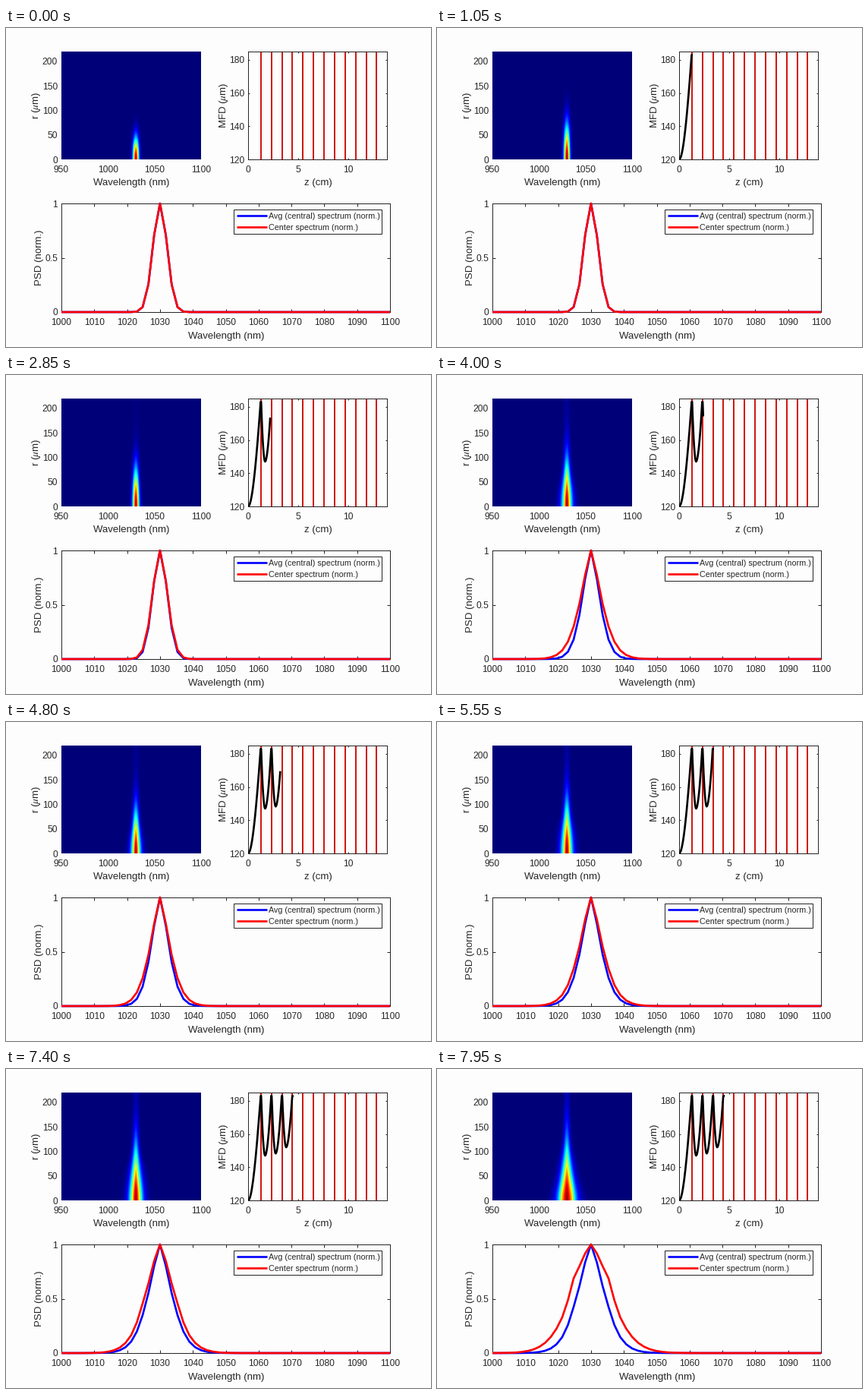
Animation of 560 by 420 pixels, one loop 8000 ms. Source, as a matplotlib script:

```python
import numpy as np
import matplotlib.pyplot as plt
from matplotlib.animation import FuncAnimation
from matplotlib.colors import LinearSegmentedColormap
from matplotlib.patches import Rectangle

plt.rcParams["font.family"] = "Liberation Sans"
plt.rcParams["mathtext.fontset"] = "stix"

W, H, DPI = 560, 420, 96
FRAMES, STEP_MS = 160, 50
INK, PAPER = "#262626", "#fdfdfd"
RED, BLUE, PLATE = "#ff0000", "#0000ff", "#d01810"

C = 299792.458            # nm * THz
F0, DF = C / 1030, 0.5    # carrier and frequency grid step
FIRST, GAP, THICK = 1.25, 1.0, 0.05   # plate layout in cm
HALF = 20                 # steps per gap and per plate
WAIST, PEAK = 120, 183    # mode field diameter at the start and at a plate
RAYLEIGH = FIRST / np.sqrt((PEAK / WAIST) ** 2 - 1)

JET = LinearSegmentedColormap.from_list("navy_jet", [
    (0, "#000078"), (0.125, "#0000ff"), (0.375, "#00ffff"),
    (0.625, "#ffff00"), (0.875, "#ff0000"), (1, "#800000")])


def to_k(lam):
    """Offset from the carrier in frequency steps."""
    return (C / lam - F0) / DF


def stage(n):
    """Plates entered, progress in the last one, progress in the gap after."""
    plate, step = divmod(n - HALF, 2 * HALF)
    step += 1
    return plate, min(step / HALF, 1), max(step / HALF - 1, 0)


def beam(n):
    """Position z (cm) and mode field diameter (um) after step n."""
    if n < HALF:
        z = FIRST * (n + 1) / HALF
        return z, WAIST * np.hypot(1, z / RAYLEIGH)
    plate, inside, u = stage(n)
    z = FIRST + plate * (GAP + THICK) + THICK * inside + GAP * u
    focus = 0.4
    low = 147 + 1.25 * plate ** 2
    bend = (1 - u / focus) ** 2 if u < focus else \
        ((u - focus) / (1 - focus)) ** 1.8
    return z, low + (PEAK - low) * bend


def broadening(n):
    """Spectral broadening, in plates passed: beam average and centre."""
    if n < HALF:
        return 0, 0
    plate, inside, u = stage(n)

    def lead(m):
        return min(m / 2, 1)

    # the centre runs ahead inside a plate, then mixes with the rest
    before, after = lead(plate) / 2, lead(plate + 1)
    ahead = before + (after - before) * inside - after / 2 * u
    avg = plate + inside
    return avg, avg + ahead


def spectrum(k, b):
    k = np.abs(k)
    a = 0.342 - 0.0102 * b ** 2
    p = 1.4 + 0.6 * np.exp(-0.15 * b ** 3) + 0.0003 * b ** 4
    shoulder = 0.08 * (b / 5) ** 6 * np.exp(-(k - 3) ** 2)
    return np.exp(-a * k ** p) + shoulder


# wavelength samples of the line plot
lam = C / (F0 + DF * np.arange(60, -61, -1))
lam = np.concatenate([[1000], lam[(lam > 1000) & (lam < 1100)], [1100]])
k_line = to_k(lam)

# image grid: hat functions blend linearly between frequency samples
k_grid = np.arange(-60, 61)
k_pix = to_k(950 + 150 * (np.arange(184) + 0.5) / 184)
HAT = np.maximum(0, 1 - np.abs(k_grid[:, None] - k_pix))
r = (220 * (np.arange(142) + 0.5) / 142)[:, None]

Z, MFD = np.array([beam(n) for n in range(FRAMES)]).T


def heat(n):
    """Spectrum over radius: Gaussian core with a faint wide halo."""
    b = broadening(n)[1]
    core = np.exp(-(r / (MFD[n] * (0.354 + 0.045 * b))) ** 2)
    halo = 0.03 * b
    profile = (1 - halo) * core + halo * np.exp(-r / 200)
    return profile * (spectrum(k_grid, b * core) @ HAT)


fig = plt.figure(figsize=(W / DPI, H / DPI), dpi=DPI, facecolor=PAPER)

# pixel-space layer for labels and legend
over = fig.add_axes([0, 0, 1, 1], zorder=5)
over.set(xlim=(0, W), ylim=(H, 0))
over.axis("off")


def write(x, y, s, size=9.9, ha="center", rotation=0):
    over.text(x, y, s, fontsize=size, ha=ha, va="baseline", color=INK,
              rotation=rotation, rotation_mode="anchor")


def panel(x0, y0, x1, y1, xlim, ylim, xticks, yticks, tick):
    ax = fig.add_axes([x0 / W, 1 - y1 / H, (x1 - x0) / W, (y1 - y0) / H],
                      facecolor=PAPER)
    ax.set(xlim=xlim, ylim=ylim, xticks=xticks, yticks=yticks)
    ax.tick_params(direction="in", length=tick, width=0.75, color=INK,
                   top=True, right=True, labelbottom=False, labelleft=False)
    for side in ax.spines.values():
        side.set(linewidth=0.75, color=INK)
    for v in xticks:
        x = x0 + (x1 - x0) * (v - xlim[0]) / (xlim[1] - xlim[0])
        write(x, y1 + 17.3, f"{v:g}", 9)
    for v in yticks:
        y = y1 - (y1 - y0) * (v - ylim[0]) / (ylim[1] - ylim[0])
        write(x0 - 5, y + 4.5, f"{v:g}", 9, "right")
    return ax


ax_map = panel(73, 31, 257, 173, (950, 1100), (0, 220),
               range(950, 1101, 50), range(0, 201, 50), 0)
ax_map.spines[:].set_visible(False)
ax_mfd = panel(319, 31, 502, 173, (0, 13.85), (120, 185),
               range(0, 11, 5), range(120, 181, 20), 1.5)
ax_psd = panel(73, 231, 506, 374, (1000, 1100), (0, 1),
               range(1000, 1101, 10), [0, 0.5, 1], 3.2)

write(165, 206.7, "Wavelength (nm)")
write(411, 206.7, "z (cm)")
write(290, 408.5, "Wavelength (nm)")
write(43.5, 102, r"r ($\mu$m)", rotation=90)
write(290, 102, r"MFD ($\mu$m)", rotation=90)
write(47.5, 302, "PSD (norm.)", rotation=90)

over.add_patch(Rectangle((299.5, 238.5), 195, 32, facecolor=PAPER,
                         edgecolor=INK, linewidth=0.75))
for y, color, label in [(247, BLUE, "Avg (central) spectrum (norm.)"),
                        (262, RED, "Center spectrum (norm.)")]:
    over.plot([304, 344], [y, y], color=color, lw=2, solid_capstyle="butt")
    write(346.5, y + 4, label, 8.1, "left")

image = ax_map.imshow(heat(0), cmap=JET, vmin=0, vmax=1, origin="lower",
                      extent=(950, 1100, 0, 220), aspect="auto",
                      interpolation="nearest")
for i in range(12):
    ax_mfd.axvline(FIRST + THICK / 2 + i * (GAP + THICK), color=PLATE, lw=1.5)
mfd_line, = ax_mfd.plot([], [], color="black", lw=2, zorder=3)


def curve(color, zorder):
    return ax_psd.plot(lam, spectrum(k_line, 0), color=color, lw=2,
                       zorder=zorder, clip_on=False,
                       solid_joinstyle="round", solid_capstyle="butt")[0]


avg_line, center_line = curve(BLUE, 3), curve(RED, 4)


def update(n):
    avg, center = broadening(n)
    image.set_data(heat(n))
    mfd_line.set_data(Z[:n + 1], MFD[:n + 1])
    avg_line.set_ydata(spectrum(k_line, avg))
    center_line.set_ydata(spectrum(k_line, center))
    return image, mfd_line, avg_line, center_line


anim = FuncAnimation(fig, update, frames=FRAMES, interval=STEP_MS,
                     repeat=True, repeat_delay=0, blit=False)
plt.show()
```
